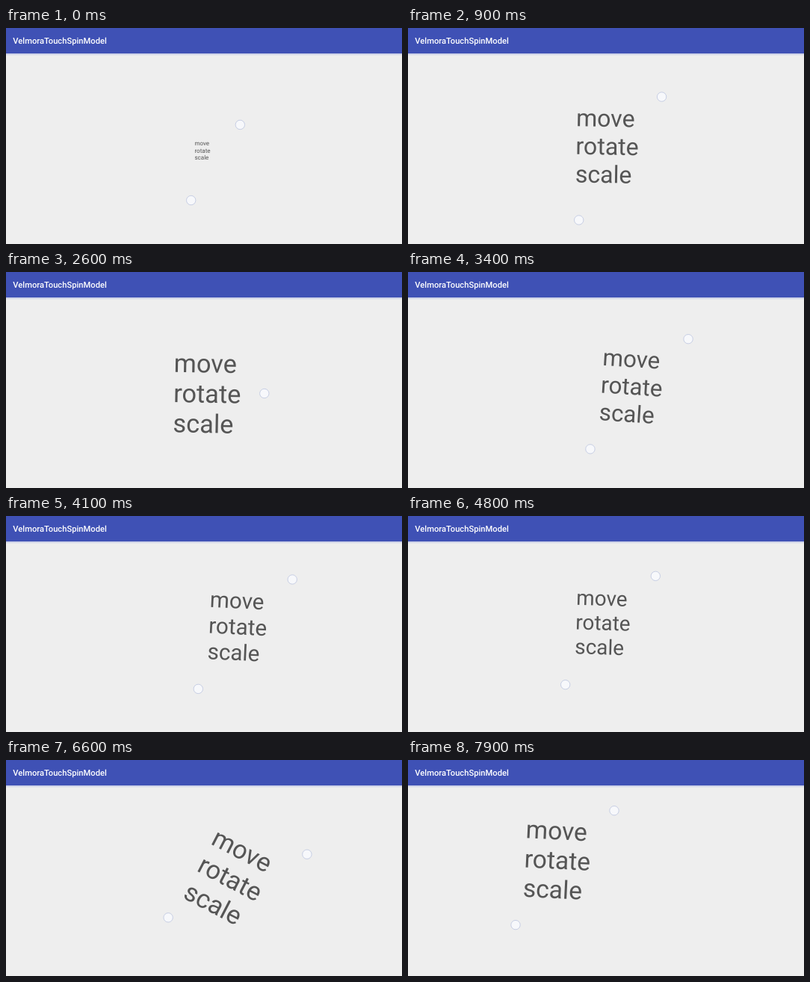
Animation of 530 by 289 pixels, one loop 8000 ms. Source, as an HTML page:

```html
<!DOCTYPE html>
<html lang="en">
<head>
<meta charset="utf-8">
<title>Two-finger transform</title>
<style>
  html, body { margin: 0; width: 100%; height: 100%; overflow: hidden; background: #eee; }
  svg { display: block; width: 100vw; height: 100vh; }
  text { font-family: Roboto, sans-serif; text-rendering: geometricPrecision; }
  #label { font-size: 35px; fill: #555; }
  circle { fill: #f7f8fb; stroke: #bcc5df; stroke-width: .8; }
</style>
</head>
<body>
<svg viewBox="0 0 530 289">
  <defs>
    <linearGradient id="shade" x2="0" y2="1">
      <stop stop-color="#bdc4e4"/>
      <stop offset="1" stop-color="#eee"/>
    </linearGradient>
  </defs>
  <rect width="530" height="289" fill="#eee"/>
  <rect y="34" width="530" height="3" fill="url(#shade)"/>
  <rect width="530" height="34" fill="#3f51b5"/>
  <text x="9.3" y="20.8" font-size="11.2" font-weight="500" fill="#fff">VelmoraTouchSpinModel</text>
  <g id="label">
    <text x="-46" y="-29">move</text>
    <text x="-46" y="12">rotate</text>
    <text x="-46" y="53">scale</text>
  </g>
  <circle id="a" r="6.2"/>
  <circle id="b" r="6.2"/>
</svg>
<script>
const LOOP = 8000, STEP = 100;
const $ = id => document.getElementById(id);

const pose = (t, x, y, size, angle, loopX = 0, loopY = 0) =>
  ({ t, x, y, size, angle, loopX, loopY });

// grip: touch centre relative to the text; turn: finger line relative to the text.
// A pose's loop is a round detour of the hand on its way to the next pose.
const gestures = [
  { grip: [17.5, 16], turn: -57, poses: [
    pose(0, 263, 164, 8, 0),
    pose(1100, 267, 158, 34.4, 1)
  ] },
  { grip: [76.5, -.5], poses: [
    pose(1400, 267, 158, 34.4, 1),
    pose(1700, 214.4, 152.5, 34.4, 1, 40, -25),
    pose(2600, 269.3, 163, 34.4, 1),
    pose(2700, 264, 161, 34.4, 1)
  ] },
  { grip: [10, 10], turn: -52, poses: [
    pose(3000, 264, 161, 34.4, 1),
    pose(3400, 299.5, 153.3, 31.4, 3.7, 30, 18),
    pose(4800, 261, 143, 27.9, 1.7, -25, 15),
    pose(6600, 300, 158.5, 34.6, 27.5, -12, 15),
    pose(7900, 200, 134.2, 33.6, 2.8)
  ] }
];

const mix = (a, b, u) => a + (b - a) * u;

function poseAt(poses, t) {
  const i = poses.findLastIndex(p => p.t <= t);
  const p = poses[i], q = poses[i + 1];
  if (!q) return p;
  const u = (t - p.t) / (q.t - p.t);
  const ease = u * u * (3 - 2 * u);
  return {
    x: mix(p.x, q.x, ease) + p.loopX * Math.sin(Math.PI * u) ** 2,
    y: mix(p.y, q.y, ease) + p.loopY * Math.sin(2 * Math.PI * u),
    size: mix(p.size, q.size, ease),
    angle: mix(p.angle, q.angle, ease)
  };
}

function touch(id, x, y, shown) {
  $(id).setAttribute("transform", `translate(${x} ${y})`);
  $(id).style.display = shown ? "" : "none";
}

function draw(t) {
  const { grip, turn, poses } = gestures.findLast(g => g.poses[0].t <= t);
  const { x, y, size, angle } = poseAt(poses, t);
  $("label").setAttribute("transform",
    `translate(${x} ${y}) rotate(${angle}) scale(${size / 35})`);

  const down = t <= poses.at(-1).t;
  const two = turn !== undefined;
  const reach = two ? 28.5 * size ** .36 : 0;
  const tilt = two ? (angle + turn) * Math.PI / 180 : 0;
  const dx = reach * Math.cos(tilt), dy = reach * Math.sin(tilt);
  const cx = x + grip[0], cy = y + grip[1];
  touch("a", cx + dx, cy + dy, down);
  touch("b", cx - dx, cy - dy, down && two);
}

const begin = performance.now();
function tick() {
  const t = (performance.now() - begin) % LOOP;
  draw(Math.floor(t / STEP) * STEP);
  requestAnimationFrame(tick);
}
tick();
</script>
</body>
</html>
```
